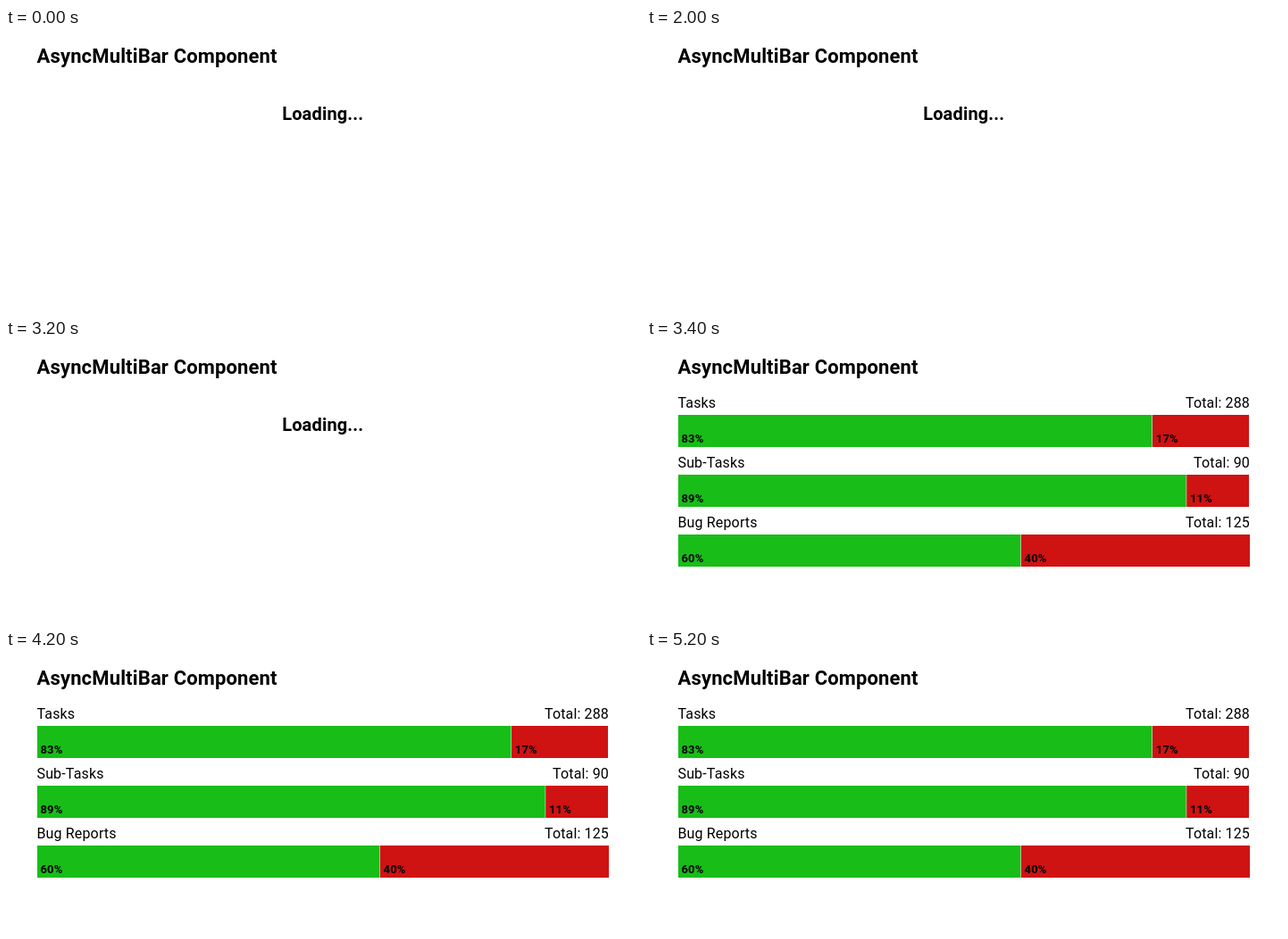
Recreate the animation shown at these times as an HTML page with a canvas. Size 711 by 317 pixels, loop 5700 ms.

```html
<!DOCTYPE html>
<html lang="en">
<head>
<meta charset="utf-8">
<title>AsyncMultiBar Component</title>
<style>
html, body { margin: 0; width: 100%; height: 100%; overflow: hidden; background: #fff; }
canvas { display: block; width: 711px; height: 317px; }
</style>
</head>
<body>
<canvas id="stage"></canvas>
<script>
const W = 711, H = 317, LOOP = 5700, LOADED = 3400;
const FAMILY = 'Roboto, "Liberation Sans", sans-serif';
const GREEN = '#18bd18', RED = '#cf1212';
const LEFT = 35;
const bars = [
  { label: 'Tasks', total: 288, done: 83, top: 85, split: 565.5, right: 674 },
  { label: 'Sub-Tasks', total: 90, done: 89, top: 152, split: 603.7, right: 674 },
  { label: 'Bug Reports', total: 125, done: 60, top: 219, split: 418.3, right: 675 }
];

const canvas = document.getElementById('stage');
const ctx = canvas.getContext('2d');
const scale = window.devicePixelRatio || 1;
canvas.width = W * scale;
canvas.height = H * scale;
ctx.scale(scale, scale);

function text(str, x, y, size, weight = 400, align = 'left', spacing = 0.15) {
  ctx.font = `${weight} ${size}px ${FAMILY}`;
  ctx.letterSpacing = spacing + 'px';
  ctx.textAlign = align;
  ctx.fillStyle = '#000';
  ctx.fillText(str, x, y);
}

function rect(color, x, y, w, h) {
  ctx.fillStyle = color;
  ctx.fillRect(x, y, w, h);
}

function drawBar({ label, total, done, top, split, right }) {
  const height = 36, gap = 0.5;
  text(label, 34.5, top - 8, 16);
  text('Total: ' + total, 675, top - 8, 16, 400, 'right');
  rect(GREEN, LEFT, top, split - LEFT, height);
  rect(RED, split + gap, top, right - split - gap, height);
  text(done + '%', LEFT + 3.5, top + 31, 13, 700);
  text(100 - done + '%', split + 4.3, top + 31, 13, 700);
}

function draw(t) {
  rect('#fff', 0, 0, W, H);
  text('AsyncMultiBar Component', 34.5, 39, 22, 700);
  if (t < LOADED) text('Loading...', 354.7, 103, 20, 700, 'center');
  else bars.forEach(drawBar);
}

const start = performance.now();
function tick() {
  draw((performance.now() - start) % LOOP);
  requestAnimationFrame(tick);
}
tick();
</script>
</body>
</html>
```
